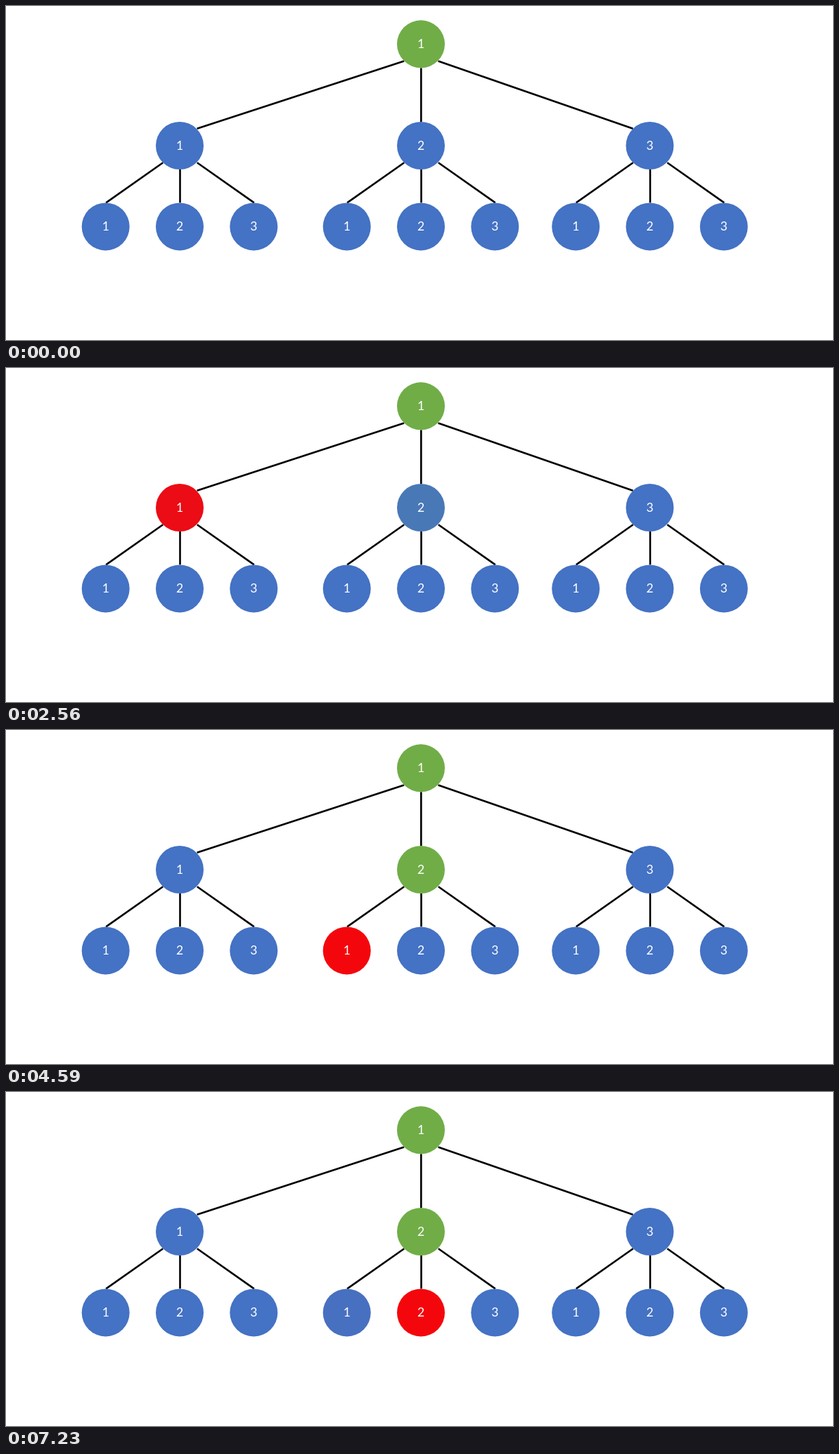
Recreate the animation shown at these times as an HTML page with a canvas. Size 1176 by 476 pixels, loop 8000 ms.

```html
<!DOCTYPE html>
<html lang="zh">
<head>
<meta charset="utf-8">
<title>Search tree</title>
<style>
  html, body { margin: 0; width: 100%; height: 100%; overflow: hidden; background: #fff; }
  canvas { display: block; }
</style>
</head>
<body>
<canvas id="stage" width="1176" height="476"></canvas>
<script>
const ctx = document.getElementById('stage').getContext('2d');
const LOOP = 8000, RADIUS = 34, REACH = 24.3;
const BLUE = [68, 114, 196], GREEN = [112, 173, 71], RED = [255, 0, 0];
const ROOT = { x: 590, y: 54.3 };
const PARENTS = [247, 590, 915.5];
const PARENT_Y = 199, LEAF_Y = 314.4, LEAF_GAP = 105.3;

// Stepped progress: 0 before start, then from a to b in equal jumps, clamped to 0..1.
function ramp(t, start, end, steps, a, b) {
  if (t < start) return 0;
  const gap = (end - start) / (steps - 1);
  const k = Math.min(steps - 1, Math.floor((t - start) / gap + 1e-6));
  return Math.max(0, Math.min(1, a + (b - a) * k / (steps - 1)));
}

function mix(from, to, p) {
  return `rgb(${from.map((v, i) => Math.round(v + (to[i] - v) * p)).join(',')})`;
}

function line(x1, y1, x2, y2) {
  ctx.beginPath();
  ctx.moveTo(x1, y1);
  ctx.lineTo(x2, y2);
  ctx.stroke();
}

function node(x, y, label, color) {
  ctx.fillStyle = color;
  ctx.beginPath();
  ctx.arc(x, y, RADIUS, 0, Math.PI * 2);
  ctx.fill();
  ctx.fillStyle = '#fff';
  ctx.font = '17.5px Lato, sans-serif';
  ctx.textAlign = 'center';
  ctx.fillText(label, x, y + 5.8);
}

function edges() {
  ctx.strokeStyle = '#000';
  ctx.lineWidth = 2.6;
  PARENTS.forEach((x, i) => {
    const side = i - 1;
    line(ROOT.x + 0.3 + side * REACH, ROOT.y + (side ? REACH : RADIUS),
         x + 0.3 - side * REACH, PARENT_Y - (side ? REACH : RADIUS));
    for (const s of [-1, 0, 1]) {
      line(x + 0.5 + s * REACH, PARENT_Y + (s ? REACH : RADIUS),
           x + 0.5 + s * LEAF_GAP, LEAF_Y - RADIUS);
    }
  });
}

function note(alpha) {
  ctx.fillStyle = `rgba(0,0,0,${alpha})`;
  ctx.textAlign = 'left';
  ctx.font = '25.4px Lato, sans-serif';
  ctx.fillText('1', 23.3, 194.5);
  ctx.font = '300 29px KaiTi, "Noto Serif CJK SC", "Noto Sans CJK SC", "Noto Sans CJK", serif';
  ctx.fillText('已经被使用过', 38.5, 195.5);
}

function draw(t) {
  ctx.fillStyle = '#fff';
  ctx.fillRect(0, 0, 1176, 476);

  const swap = t < 3040 ? ramp(t, 2560, 2890, 5, 0.105, 0.99) : 1;
  const firstRed = ramp(t, 1090, 1550, 7, 0.16, 1.508) * (1 - swap);
  const secondGreen = ramp(t, 2560, 2890, 5, 0.105, 1.01);
  const leafOn = ramp(t, 4280, 4590, 5, 0.04, 0.94);
  const leafRed = t < 5910 ? leafOn : ramp(t, 5910, 6230, 5, 0.91, 0.02);
  const nextRed = ramp(t, 7000, 7230, 4, 0.265, 0.94);

  const parentColors = [
    mix(BLUE, RED, firstRed),
    mix(BLUE, GREEN, secondGreen),
    mix(BLUE, RED, 0)
  ];
  const leafColors = [mix(BLUE, RED, leafRed), mix(BLUE, RED, nextRed)];

  edges();
  node(ROOT.x, ROOT.y, '1', mix(GREEN, GREEN, 0));
  PARENTS.forEach((x, i) => {
    node(x, PARENT_Y, String(i + 1), parentColors[i]);
    for (let j = 0; j < 3; j++) {
      const color = i === 1 && leafColors[j] || mix(BLUE, RED, 0);
      node(x + (j - 1) * LEAF_GAP, LEAF_Y, String(j + 1), color);
    }
  });

  if (t >= 1090 && t < 2560) note(ramp(t, 1090, 1550, 7, 0, 1));
}

const begin = performance.now();
function tick() {
  draw((performance.now() - begin) % LOOP);
  requestAnimationFrame(tick);
}
tick();
</script>
</body>
</html>
```
